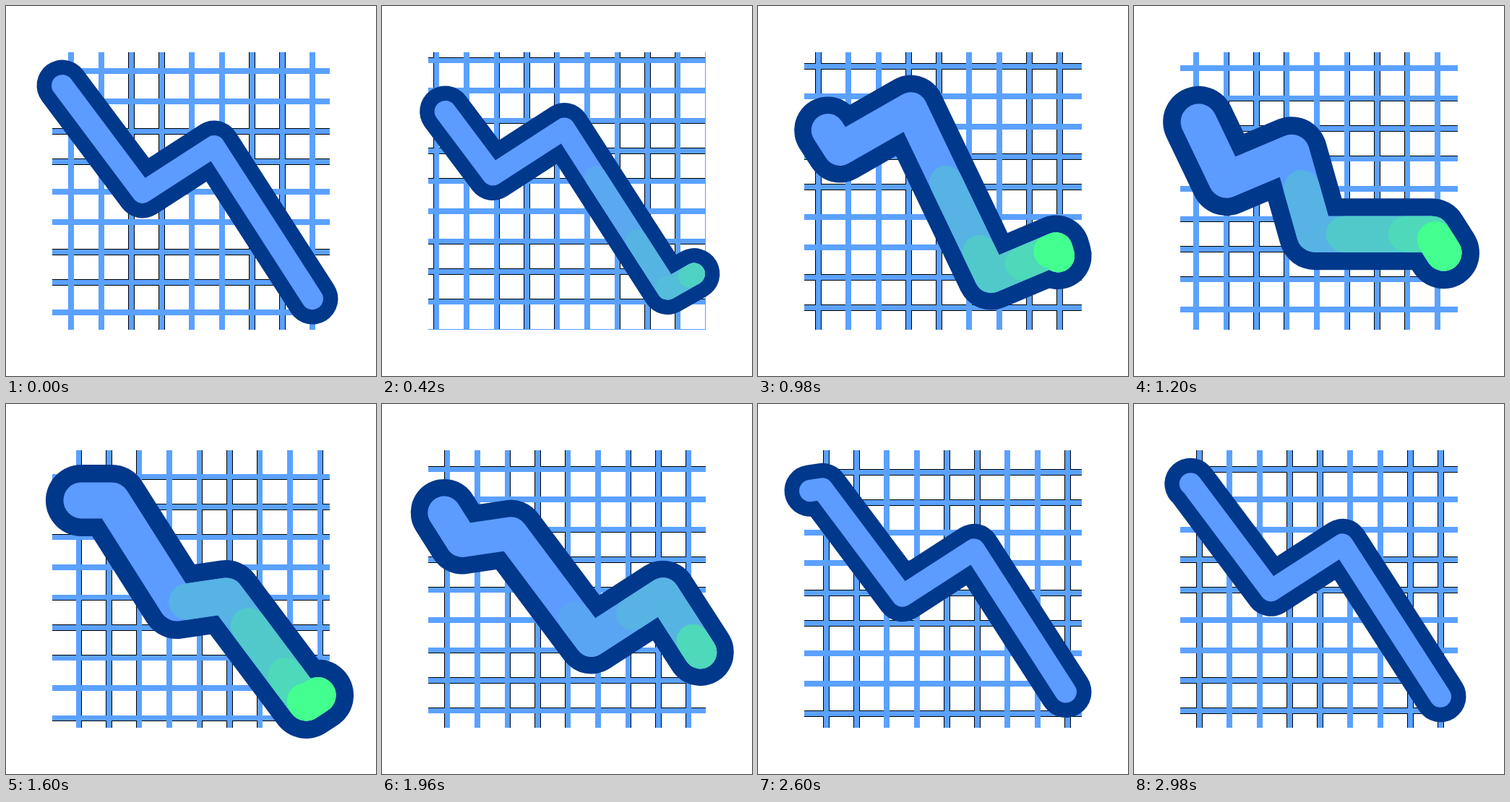
Animation of 512 by 512 pixels, one loop 3.02 s. Source, as an HTML page with a canvas:

```html
<!DOCTYPE html>
<html lang="en">
<head>
<meta charset="utf-8">
<title>Falling chart</title>
<style>
  html, body { margin: 0; width: 100%; height: 100%; overflow: hidden; background: #fff; }
  canvas { display: block; width: 512px; height: 512px; }
</style>
</head>
<body>
<canvas id="stage" width="512" height="512"></canvas>
<script>
const ctx = document.getElementById('stage').getContext('2d');
const LOOP = 3020;
const NAVY = '#00388b';
const BLUE = [92, 155, 255];
const GREEN = [67, 255, 143];

// One period of the zigzag, as steps from corner to corner
const STEPS = [
  [111, 148], [99, -64], [143, 222], [98, -56], [111, 232],
  [90, -38], [32, 113], [162, 0], [90, 142], [68, -10]
];

const knots = [{ x: 78, y: 110, at: 0 }];
for (const [dx, dy] of [...STEPS, ...STEPS]) {
  const p = knots[knots.length - 1];
  knots.push({ x: p.x + dx, y: p.y + dy, at: p.at + Math.hypot(dx, dy) });
}
const first = knots[0], repeat = knots[STEPS.length];
const PERIOD = repeat.at;
const SHIFT_X = repeat.x - first.x, SHIFT_Y = repeat.y - first.y;
const SPAN = 554;

// Keys: [time, value, slope]
const TRAVEL = [
  [0, 0, 0], [760, 0.1615, 0.00056], [1200, 0.509, 0.00092],
  [1600, 0.774, 0.00045], [1960, 0.8995, 0.00023],
  [2600, 0.989, 0.000052], [LOOP, 1, 0.000012]
];
const LEAD = [
  [0, 0, 0.03], [760, 38, 0.04], [1200, 57, 0.08], [1600, 71, -0.06],
  [1960, 41, -0.09], [2600, 0, 0], [LOOP, 0, 0]
];

// Tints growing from the tip: length, loss when thin, strength, fade time
const TINTS = [
  { len: 259, loss: 32, mix: 0.24, fade: 450 },
  { len: 152, loss: 30, mix: 0.46, fade: 540 },
  { len: 66, loss: 21, mix: 0.62, fade: 435 },
  { len: 22, loss: 14, mix: 1, fade: 680 }
];

const clamp = v => Math.min(1, Math.max(0, v));
const ramp = (t, a, b) => clamp((t - a) / (b - a));
const smooth = p => p * p * (3 - 2 * p);

function hermite(keys, t) {
  let i = 0;
  while (i < keys.length - 2 && t > keys[i + 1][0]) i++;
  const [t0, v0, m0] = keys[i], [t1, v1, m1] = keys[i + 1];
  const d = t1 - t0, p = (t - t0) / d, q = 1 - p;
  return v0 + (v1 - v0) * smooth(p) + d * p * q * (m0 * q - m1 * p);
}

function blend(k) {
  return `rgb(${BLUE.map((c, i) => Math.round(c + (GREEN[i] - c) * k)).join()})`;
}

function pointAt(s) {
  let i = 0;
  while (i < knots.length - 2 && s > knots[i + 1].at) i++;
  const a = knots[i], b = knots[i + 1], p = (s - a.at) / (b.at - a.at);
  return { x: a.x + (b.x - a.x) * p, y: a.y + (b.y - a.y) * p };
}

function strokePart(from, to, width, color) {
  const pts = [pointAt(from), ...knots.filter(k => k.at > from && k.at < to), pointAt(to)];
  ctx.beginPath();
  pts.forEach(p => ctx.lineTo(p.x, p.y));
  ctx.lineWidth = width;
  ctx.strokeStyle = color;
  ctx.stroke();
}

function drawGrid(move) {
  const gap = 41.75, half = 4.2, min = 64, size = 384;
  const start = 90.1 - move * gap * 10;
  const offset = ((start - min + half) % gap + gap) % gap + min - half;
  const bars = (color, lo, hi) => {
    ctx.fillStyle = color;
    for (let c = offset; c < min + size + half; c += gap) {
      const a = lo(c - half), w = hi(c + half) - a;
      ctx.fillRect(a, min, w, size);
      ctx.fillRect(min, a, size, w);
    }
  };
  ctx.save();
  ctx.beginPath();
  ctx.rect(min, min, size, size);
  ctx.clip();
  bars('#000', Math.round, Math.round);
  bars('#5ba1ff', Math.ceil, Math.floor);
  ctx.restore();
}

function draw(t) {
  const move = hermite(TRAVEL, t);
  const tail = move * PERIOD + hermite(LEAD, t);
  const head = move * PERIOD + SPAN;
  const swell = smooth(ramp(t, 560, 1160)) * (1 - smooth(ramp(t, 1650, 2680)));
  const inner = 30 + 20 * swell;

  ctx.fillStyle = '#fff';
  ctx.fillRect(0, 0, 512, 512);
  drawGrid(move);

  ctx.save();
  ctx.translate(-move * SHIFT_X, -move * SHIFT_Y);
  ctx.lineCap = ctx.lineJoin = 'round';
  strokePart(tail, head, 71 + 28 * swell, NAVY);
  strokePart(tail, head, inner, blend(0));
  for (const { len, loss, mix, fade } of TINTS) {
    const show = ramp(t, 150, 650) * (1 - ramp(t, 1700, 1700 + fade));
    if (show > 0) strokePart(head - len + loss * (1 - swell), head, inner, blend(mix * show));
  }
  ctx.restore();
}

function tick() {
  draw(performance.now() % LOOP);
  requestAnimationFrame(tick);
}
tick();
</script>
</body>
</html>
```
